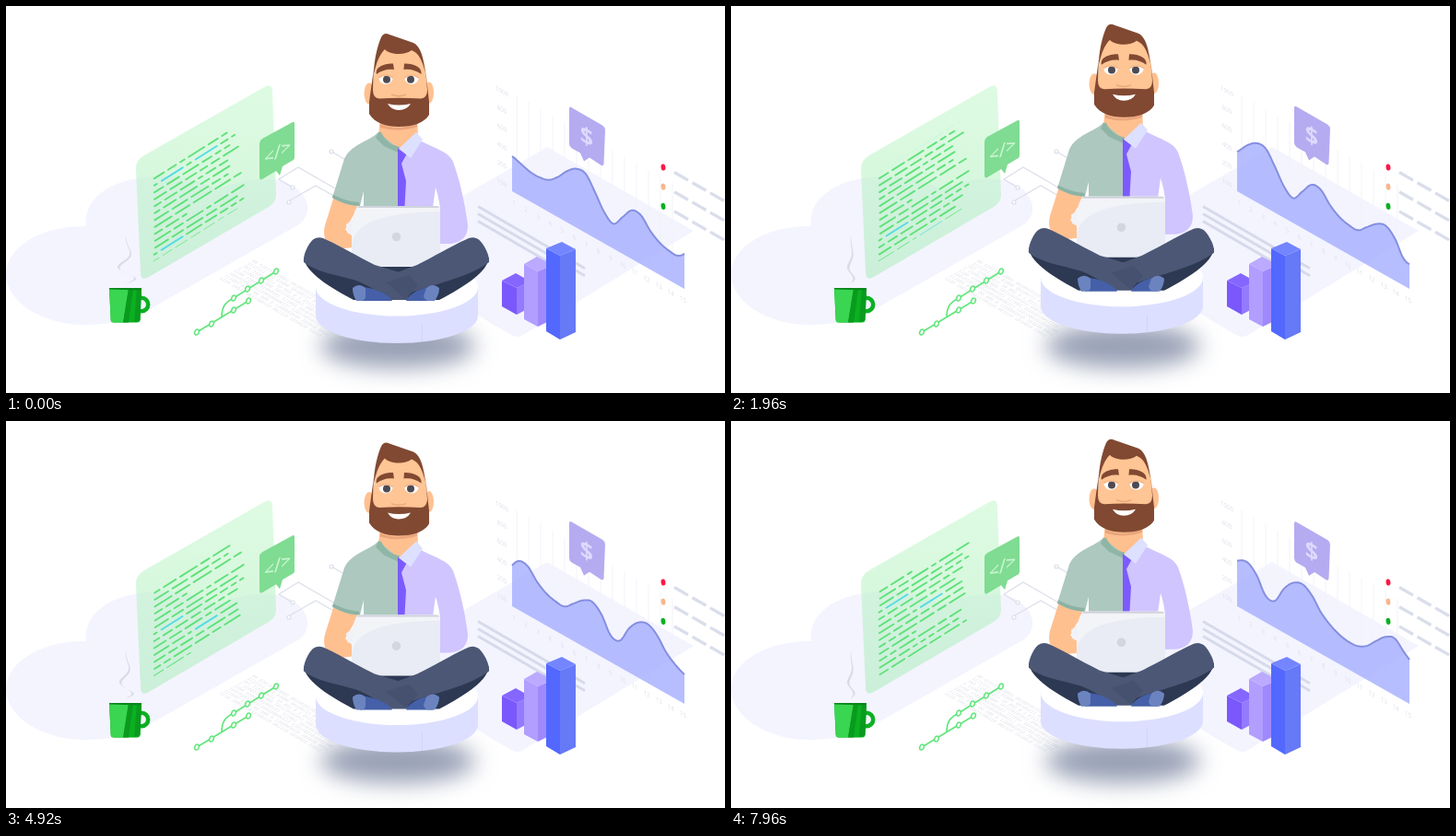
These frames come from a looping animation (780x420 px, 8000 ms). An HTML page:

```html
<!DOCTYPE html>
<html lang="en">
<head>
<meta charset="utf-8">
<title>Developer at work</title>
<style>
html, body { margin: 0; width: 100%; height: 100%; overflow: hidden; background: #fff; }
svg { display: block; width: 780px; height: 420px; }
text { font-family: "Open Sans", Arial, sans-serif; }
.mono text { font-family: "DejaVu Sans Mono", monospace; }
</style>
</head>
<body>
<svg viewBox="0 0 780 420">
  <defs>
    <filter id="blur" x="-40%" y="-150%" width="180%" height="400%"><feGaussianBlur stdDeviation="12"/></filter>
    <linearGradient id="panel" x1="0" y1="0" x2="0" y2="1">
      <stop offset="0" stop-color="#c3f8cb" stop-opacity=".55"/>
      <stop offset="1" stop-color="#a9ebb9" stop-opacity=".55"/>
    </linearGradient>
    <clipPath id="codeClip"><path d="M155 184.500L270 112V208L155 280.500Z"/></clipPath>
  </defs>

  <g fill="#f4f4ff">
    <path d="M0 291C0 262 38 238 87 239C83 208 116 185 168 185C196 185 216 191 228 200C250 188 286 184 306 192C327 202 335 224 318 237L158 328C137 341 112 346 85 346C38 346 0 320 0 291Z"/>
    <path d="M587 153L746 244L561 357Q555 361 548 357L393 266Z"/>
  </g>

  <g id="binary" class="mono" font-size="5" fill="#dfe0e8"></g>

  <g fill="none" stroke="#dcdfe9" stroke-width="1.200">
    <path d="M309 196L296 188L317 175L376 209M308 211L336 195L380 220M355 159L392 181"/>
    <g fill="#fff"><circle cx="311" cy="197" r="2"/><circle cx="307" cy="213" r="2"/><circle cx="353" cy="158" r="2"/></g>
  </g>

  <g fill="none" stroke="#63e67d" stroke-width="1.700">
    <path d="M207 354L263 320M234 338C234 327 237 322 247 317L293 288"/>
    <g id="commits" fill="#fff" stroke-width="1.500"></g>
  </g>

  <path d="M141 178Q140 168 150 162L280 88Q289 83 289 93L293 205Q293 213 285 218L155 294Q146 299 146 289Z" fill="url(#panel)"/>
  <g clip-path="url(#codeClip)"><g id="code" stroke-width="1.900" stroke-linecap="round"></g></g>

  <g id="codeTag">
    <path d="M275 148Q275 145 278 143L311 125Q313 124 313 127V163Q313 166 310 167L300 173L297 183L293 178L278 187Q275 188.500 275 185Z" fill="#7fdc92"/>
    <text transform="matrix(1 -.56 0 1 294.500 164)" text-anchor="middle" font-size="19" font-weight="600" fill="#caf4d2">&lt;/&gt;</text>
  </g>

  <g>
    <circle cx="147" cy="324" r="7.200" fill="none" stroke="#0bb021" stroke-width="4.500"/>
    <path d="M112 306H147L145.500 341Q145 343.500 142 343.500H117Q114 343.500 113.700 341Z" fill="#0bb021"/>
    <path d="M112 306H133L127 343.500H117Q114 343.500 113.700 341Z" fill="#3ad551"/>
    <path d="M133 307H138L133 343.500H127ZM142 307H147L145.500 341L139 343Z" fill="#0a9a1e"/>
    <path d="M112 306H147L146.900 308.500L112.100 307.500Z" fill="#08861a"/>
    <path id="steam" fill="#d9dbe6"/>
  </g>

  <g id="stripes" stroke="#d6daea" stroke-width="3" stroke-linecap="butt"></g>
  <g id="grid" stroke="#f3f3fa"></g>
  <g id="labels" font-size="7" fill="#dddeea" text-anchor="middle"></g>
  <path id="fill" fill="#a9b2ff" fill-opacity=".84"/>
  <path id="curve" fill="none" stroke="#858fe0" stroke-width="2"/>

  <g id="moneyTag">
    <path d="M611 111Q611 108 614 110L647 129Q650 131 650 134L648.500 171Q648 174 645 172L633 164L627 168L623 159L614 154Q611 152 611 149Z" fill="#b5abf1"/>
    <text transform="matrix(1 .5 0 1 630 150)" text-anchor="middle" font-size="25" font-weight="700" fill="#dfd9fd">$</text>
  </g>

  <g id="bars"></g>
  <g id="legend" stroke="#dadeeb" stroke-width="3.300"></g>
  <g id="dots"></g>

  <ellipse cx="425" cy="369" rx="84" ry="24" fill="#98a0b5" filter="url(#blur)"/>

  <g id="man">
    <path d="M336 304V336A88 30 0 0 0 512 336V304Z" fill="#dcdfff"/>
    <ellipse cx="424" cy="305" rx="88" ry="31.500" fill="#fff"/>
    <path d="M451.500 345V364" stroke="#cfd3f5" stroke-width=".8"/>

    <path d="M406 120H446L447 142L429 163L404 141Z" fill="#ffc090"/>
    <path d="M406 128Q426 137 446 126V131Q426 138 406 132Z" fill="#eaa57d"/>
    <path d="M357 203L383 212L378 225L368 243L376 246V262L358 264C347 261 343 250 346 238Z" fill="#ffc090"/>

    <path d="M404 137C394 147 374 150 367 166L354 208C362 213 374 217 384 217L388 201V226H426V155Z" fill="#adc8bf"/>
    <path d="M354 208C362 213 374 217 384 217L383 213C374 213 363 209 355 204.500Z" fill="#8cb2a3"/>
    <path d="M404 137L401 143L410 152L425 159L427 153C418 151 411 146 407 137Z" fill="#8fb5a6"/>
    <path d="M425 157L451 147C466 155 480 158 485 169C492 188 498 214 501 238C501 250 495 256 483 258H468V221L471 220C470 211 468 203 466 197L462 226H425Z" fill="#d0c5ff"/>
    <path d="M425 154L435 160L429 171L434 190L432 226H425Z" fill="#7b5bff"/>
    <path d="M445 137L452 145L439 165L426 155Z" fill="#dde0ff"/>

    <ellipse cx="394" cy="95" rx="5.500" ry="11.500" fill="#ffc090"/>
    <ellipse cx="459" cy="94" rx="5" ry="11.500" fill="#ffc090"/>
    <path d="M400 68C402 54 407 46 412 45L444 47C451 52 454 62 456 76L458 108H396Z" fill="#ffc594"/>
    <path d="M399 70C400 56 403 43 407 34C409 30 412 29 416 31L442 40C450 44 453 56 455 73C452 60 448 51 440 48C433 54 416 53 411 47C405 53 402 61 399 74Z" fill="#814932"/>
    <path d="M399 68L394 104V117C400 127 412 131 426 131C441 131 454 127 459 118V104L455 68L457 91Q457 100 450 100.500Q426 99 405 100.500Q398 100 398 91Z" fill="#814932"/>
    <path d="M414 106Q426 109 439 106Q435 113 426 113Q418 113 414 106Z" fill="#fff"/>
    <path d="M418 96Q426 99.500 434 96" fill="none" stroke="#eba87d" stroke-width="1.500"/>
    <g id="eyes"></g>
    <path d="M402 74C400 66 411 62 420 62.500L421 69C414 68 407 70 402 74ZM432 62.500C441 62 452 66 450.500 74C445 70 439 68 431.500 69Z" fill="#814932"/>

    <path d="M372 276H474L466 305L424 310L384 300Z" fill="#2d3852"/>
    <path d="M369 237L377 231V250L370 246Z" fill="#f1f2f7"/>
    <path d="M384 217H467Q471 217 471 221V283H375V243C376 228 378 219 384 217Z" fill="#e9ecf4"/>
    <path d="M375 260C378 238 400 224 471 223V220Q471 217 467 217H384C378 219 376 228 375 243Z" fill="#f3f4f8"/>
    <path d="M380 219Q382 217 385 217H466Q470 217 470 219Z" fill="#d0d3dc"/>
    <circle cx="423.500" cy="250.500" r="4.800" fill="#d3d6e1"/>

    <path d="M323 273C325 290 353 306 377 319H404L436 300Z" fill="#2d3852"/>
    <path d="M524 273C522 290 494 306 470 319H436L432 301Z" fill="#2d3852"/>
    <path d="M524 278C525 270 518 258 513 253.500Q508 250 502 252C486 259 466 271 446 281L411 294L434 313C458 303 500 296 524 278Z" fill="#4c5775"/>
    <path d="M323 278C322 270 328 258 333 253.500Q338 250 344 252C360 259 380 271 400 281L437 292L436 319H414C404 310 393 303 380 298C355 291 335 288 323 278Z" fill="#4c5775"/>
    <path d="M412 300L437 292L447 303L434 318Z" fill="#465170"/>
    <path d="M383 305C398 305 416 313 419 320H384ZM463 305C450 305 438 312 434 320H463Z" fill="#4560a8"/>
    <path d="M376 306Q383 300 390 306V316Q389 320 385 320H380Q376 313 376 306ZM470 306Q463 300 456 306L453 315Q454 319 458 320H465Q470 313 470 306Z" fill="#6b84c0"/>
  </g>
</svg>
<script>
const NS = 'http://www.w3.org/2000/svg', LOOP = 8000, SWAY = 6000;
const $ = id => document.getElementById(id);
const TAU = Math.PI * 2;

function add(parent, tag, attrs, text) {
  const el = document.createElementNS(NS, tag);
  for (const k in attrs) el.setAttribute(k, attrs[k]);
  if (text !== undefined) el.textContent = text;
  return parent.appendChild(el);
}
const line = (parent, x1, y1, x2, y2, more) => add(parent, 'line', { x1, y1, x2, y2, ...more });

let seed = 11;
const rnd = () => (seed = (seed * 16807) % 2147483647) / 2147483647;

// Scrolling code: some rows carry highlighted dashes at given offsets
const SLOPE = 0.63, PITCH = 7.5;
const marks = { 1: [9, 46], 11: [9], 14: [46] };
for (let row = 0; row < 23; row++) {
  const v = 188 + row * PITCH, x0 = 159.5 + (v % 90) * 0.015;
  const dash = (a, b, color = '#5fe17a') =>
    line($('code'), x0 + a, v - a * SLOPE, x0 + b, v - b * SLOPE, { stroke: color });
  const todo = [...(marks[row] || [])];
  const end = row % 9 === 8 ? 40 : 80 + rnd() * 18;
  for (let u = 1; u < end - 3;) {
    const next = todo.length ? todo[0] : Infinity;
    if (u >= next - 5) {
      u = todo.shift();
      dash(u, u + 23, '#56dbe4');
      u += 27.5;
      continue;
    }
    const stop = Math.min(u + 4 + rnd() * 15, end, next - 5);
    dash(u, stop);
    u = stop + 4.5;
  }
}

// Tiny printed rows
for (let r = 0; r < 8; r++) {
  let s = '';
  for (let i = 0; i < 43; i++) s += rnd() < 0.12 ? ' ' : rnd() < 0.5 ? '0' : '1';
  add($('binary'), 'text', { transform: `matrix(.87 .5 -.87 .5 ${266 - r * 5} ${277 + r * 2.7})` }, s);
}

[[207, 354], [223, 345], [247, 330], [263, 320], [247, 317], [262, 307], [277, 298], [293, 288]]
  .forEach(([x, y]) => add($('commits'), 'ellipse',
    { cx: x, cy: y, rx: 2.2, ry: 3, transform: `rotate(25 ${x} ${y})` }));

// Chart furniture
const X0 = 549, X1 = 736, base = x => 201 + (x - X0) * 0.567;
for (let i = 0; i < 15; i++) {
  const x = 554 + i * 13;
  if (x < X1) line($('grid'), x, base(x), x, base(x) - 107);
  add($('labels'), 'text', { transform: `matrix(.87 .5 0 1 ${551 + i * 13.1} ${216 + i * 7.5})` }, i + 1);
}
['1000', '800', '600', '400', '200', '100'].forEach((s, i) =>
  add($('labels'), 'text', { transform: `matrix(.87 .5 0 1 538 ${95 + i * 19.8})` }, s));
[628, 628, 590].forEach((x, i) => {
  const y = 217.5 + i * 8;
  line($('stripes'), 512, y, x, y + (x - 512) * 0.58);
});

// Isometric bars: left, corner and right x; their top y; back corner; their bottom y
function bar(xl, xc, xr, yl, yc, yr, xb, yb, bl, bc, br, [left, right, top]) {
  const poly = (fill, ...p) => add($('bars'), 'polygon', { points: p.join(' '), fill });
  poly(left, xl, yl, xc, yc, xc, bc, xl, bl);
  poly(right, xc, yc, xr, yr, xr, br, xc, bc);
  poly(top, xl, yl, xb, yb, xr, yr, xc, yc);
}
bar(538, 554, 569, 298, 306, 299, 553, 290, 326, 335, 327, ['#7a58fb', '#937afe', '#8567ff']);
bar(562, 577, 593, 280, 288, 281, 576, 272, 340, 348, 340, ['#b19eff', '#9f89fc', '#bbaaff']);
bar(586, 601, 618, 263, 271, 264, 603, 256, 353, 362, 354, ['#5268ff', '#6679f6', '#7385ff']);

// Legend
const dots = ['#ff1744', '#f8b58c', '#0cb022'].map((fill, i) => {
  const y = 175 + i * 21.2;
  for (let k = 0; k < 3; k++) {
    const x = 725 + k * 19.5, yy = y + 5.5 + k * 11.2;
    line($('legend'), x, yy, x + 15, yy + 8.6);
  }
  const shape = { cx: 0, cy: 0, rx: 2.4, ry: 3.6, fill, transform: 'rotate(-10)' };
  const g = add($('dots'), 'g', {});
  const halo = add(g, 'ellipse', { ...shape, rx: 3.8, ry: 5.4 });
  add(g, 'ellipse', shape);
  return { g, halo, y, peak: 400 + i * 220 };
});

for (const x of [412, 440]) {
  const dir = x < 426 ? 1 : -1;
  add($('eyes'), 'path', { d: `M${x - 8} 78Q${x} 73 ${x + 8} 78Q${x + 6} 85 ${x} 85Q${x - 6} 85 ${x - 8} 78Z`, fill: '#fff' });
  add($('eyes'), 'circle', { cx: x + dir, cy: 79.8, r: 4, fill: '#4d4a53' });
  add($('eyes'), 'path', { d: `M${x - 8} 78Q${x} 72 ${x + 8} 78`, fill: 'none', stroke: '#f3b68a', 'stroke-width': 1.6 });
}

// Chart heights every 10px along the scrolling baseline
const heights = [38, 35, 32, 32, 35, 44, 56, 64, 64, 50, 34, 27, 40, 53, 53, 42, 35, 32, 32, 41,
  50, 54, 46, 29, 29, 48, 60, 64, 58, 45, 37, 32, 30, 31, 37, 48, 58, 62, 53, 45, 38];
function heightAt(s) {
  const i = Math.floor(s / 10), f = s / 10 - i;
  const h = k => heights[Math.max(0, Math.min(heights.length - 1, k))];
  const a = h(i - 1), b = h(i), c = h(i + 1), d = h(i + 2);
  return b + f / 2 * (c - a + f * (2 * a - 5 * b + 4 * c - d + f * (3 * (b - c) + d - a)));
}

function drawChart(t) {
  const pts = [];
  for (let x = X0; x <= X1; x++) {
    pts.push(`${x} ${(base(x) - heightAt(x - X0 + t * 0.025)).toFixed(2)}`);
  }
  const d = 'M' + pts.join('L');
  $('curve').setAttribute('d', d);
  $('fill').setAttribute('d', `${d}L${X1} ${base(X1)}L${X0} ${base(X0)}Z`);
}

function drawSteam(t) {
  const amp = 1.2 + 4.9 * (1 + Math.cos(TAU * t / SWAY));
  const left = [], right = [];
  for (let p = 0; p <= 1.001; p += 0.02) {
    const x = 130 + amp * (0.2 + 0.8 * p) * Math.sin(TAU * 1.5 * p ** 1.6);
    const y = 251 + p * 50, w = (0.3 + 1.5 * p) * Math.min(1, (1.01 - p) * 6);
    left.push(`${(x - w).toFixed(2)} ${(y - w * 0.5).toFixed(2)}`);
    right.unshift(`${(x + w).toFixed(2)} ${(y + w * 0.5).toFixed(2)}`);
  }
  $('steam').setAttribute('d', 'M' + left.concat(right).join('L') + 'Z');
}

const shift = (id, y) => $(id).setAttribute('transform', `translate(0 ${y.toFixed(3)})`);

function draw(t) {
  shift('man', -12 * Math.abs(Math.sin(Math.PI * t / SWAY)));
  shift('code', -0.0078 * t);
  shift('codeTag', 1.1 * Math.cos(TAU * t / 3600));
  shift('moneyTag', 0.4 * Math.cos(TAU * t / 3600));
  drawChart(t);
  drawSteam(t);
  for (const { g, halo, y, peak } of dots) {
    const near = Math.max(0, 1 - Math.abs(t % SWAY - peak) / 250);
    const pulse = Math.sin(near * Math.PI / 2);
    g.setAttribute('transform', `translate(713 ${y}) scale(${1 + 0.15 * pulse})`);
    halo.setAttribute('opacity', 0.4 * pulse);
  }
}

const start = performance.now();
function tick() {
  draw((performance.now() - start) % LOOP);
  requestAnimationFrame(tick);
}
tick();
</script>
</body>
</html>
```
